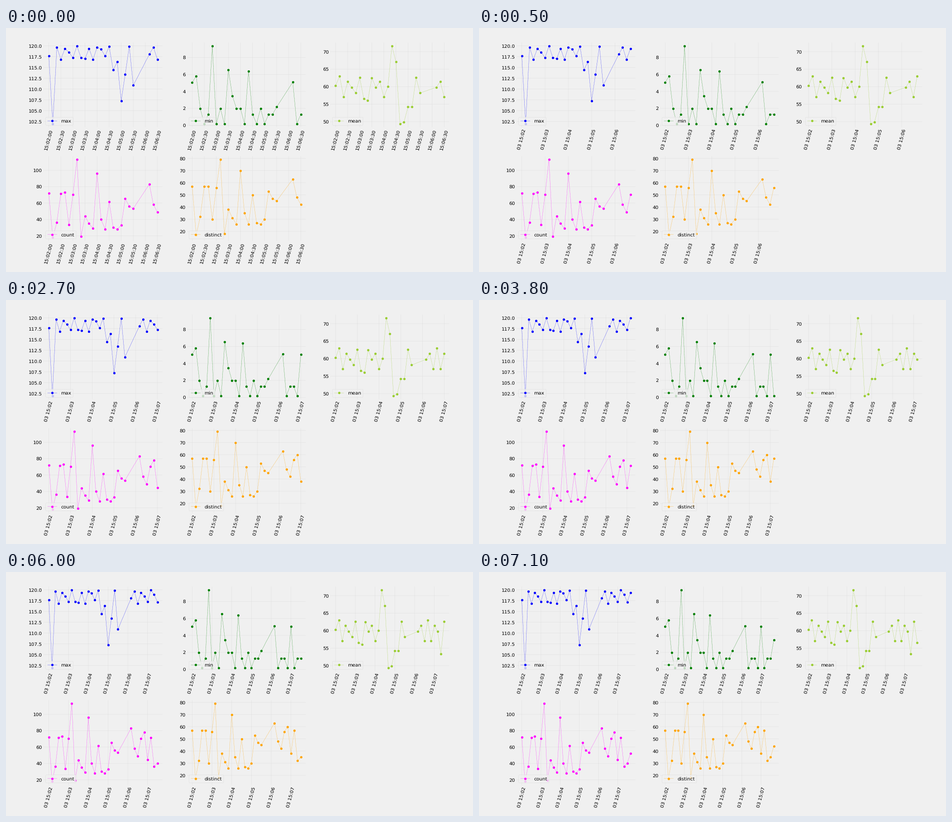
Write a matplotlib script that moves like this. It is 1032 by 542 pixels and loops after 8000 ms.

```python
from math import cos, exp, pi

import matplotlib.pyplot as plt
from matplotlib.animation import FuncAnimation
from matplotlib.ticker import FuncFormatter, MultipleLocator

W, H, DPI = 1032, 542, 53.75
STEP_MS = 100
LOOP_MS = 8000
FIRST_MS, NEXT_MS = 500, 1100  # first new sample, then one per period
START_COUNT, TOTAL = 25, 32
BG = "#f0f0f0"

plt.rcParams.update({
    "font.family": "DejaVu Sans",
    "font.size": 14,
    "text.hinting": "none",
    "path.snap": False,
    "figure.facecolor": BG,
    "axes.facecolor": BG,
    "axes.edgecolor": BG,
    "axes.linewidth": 3,
    "axes.grid": True,
    "axes.axisbelow": True,
    "grid.color": "#cbcbcb",
    "grid.linewidth": 1,
    "grid.alpha": 0.35,
    "patch.linewidth": 0.5,
    "xtick.major.size": 0,
    "ytick.major.size": 0,
})


def sample_time(i):
    """Seconds after 15:02:00, with an outage of three samples."""
    return 10 * (i if i < 22 else i + 3)


def series(base, swing, period, peak, spikes):
    """A regular wave, broken by single readings that stand out."""
    return [spikes.get(i, base + swing * cos(2 * pi * (i - peak) / period))
            for i in range(TOTAL)]


def distinct_of(n):
    """Expected number of different values among n draws."""
    return round(146 * (1 - exp(-n / 146)))


highs = series(118.4, 1.55, 2.625, 7, {
    1: 101.97, 9: 117.05, 13: 119.25, 16: 114.4, 17: 116.3, 18: 107.3,
    19: 113.45, 21: 110.87, 29: 118.9, 30: 117.2})
lows = series(1, 1, 2.5, 2, {
    0: 5.05, 1: 5.82, 5: 9.36, 9: 6.53, 10: 3.45, 11: 2, 14: 6.38,
    21: 2.17, 22: 5.1, 27: 5.05, 31: 3.45})
means = series(59.8, 3.2, 2.4, 1, {
    0: 60.3, 8: 56, 9: 62.55, 13: 60, 14: 71.64, 15: 67.12, 16: 49.4,
    17: 49.9, 18: 54.2, 19: 54.2, 29: 53.4})
counts = series(50, 22, 3.1, 0, {
    1: 18, 4: 73, 7: 113, 8: 19, 9: 44, 10: 35, 12: 96, 13: 40, 16: 30,
    18: 33, 20: 56, 22: 83, 23: 58, 26: 78, 31: 52})
distincts = [distinct_of(n) for n in counts]
times = [sample_time(i) for i in range(TOTAL)]


def clock_seconds(s, pos=None):
    return f"15:{2 + int(s) // 60:02d}:{int(s) % 60:02d}"


def day_minutes(s, pos=None):
    return f"03 15:{2 + int(s) // 60:02d}"


def padded(low, high):
    pad = 0.05 * (high - low)
    return low - pad, high + pad


fig = plt.figure(figsize=((W + 1e-6) / DPI, (H + 1e-6) / DPI), dpi=DPI)
fig.subplots_adjust(left=0.08, right=0.95, bottom=0.1256, top=0.9424,
                    wspace=0.2, hspace=0.328)


def add_panel(slot, name, values, color, low, high):
    ax = fig.add_subplot(2, 3, slot)
    line, = ax.plot(times, values, "o--", color=color, lw=0.6, label=name)
    ax.set_ylim(padded(low, high))
    ax.tick_params(axis="x", rotation=75)
    ax.legend(loc="lower left")
    return ax, line, values


panels = [
    add_panel(1, "max", highs, "blue", 101.97, 119.98),
    add_panel(2, "min", lows, "green", 0.19, 9.36),
    add_panel(3, "mean", means, "yellowgreen", 49.4, 71.64),
    add_panel(4, "count", counts, "magenta", 18, 113),
    add_panel(5, "distinct", distincts, "orange", 15, 79),
]


def update(frame):
    ms = frame * STEP_MS
    added = 0 if ms < FIRST_MS else 1 + (ms - FIRST_MS) // NEXT_MS
    n = START_COUNT + added
    left, right = padded(0, times[n - 1])
    # Ticks switch to whole minutes once the view spans five of them
    whole = right - left >= 300
    for ax, line, values in panels:
        line.set_data(times[:n], values[:n])
        ax.set_xlim(left, right)
        ax.xaxis.set_major_locator(MultipleLocator(60 if whole else 30))
        ax.xaxis.set_major_formatter(
            FuncFormatter(day_minutes if whole else clock_seconds))
    return [line for _, line, _ in panels]


anim = FuncAnimation(fig, update, frames=LOOP_MS // STEP_MS,
                     interval=STEP_MS, repeat=True, repeat_delay=0)
plt.show()
```
